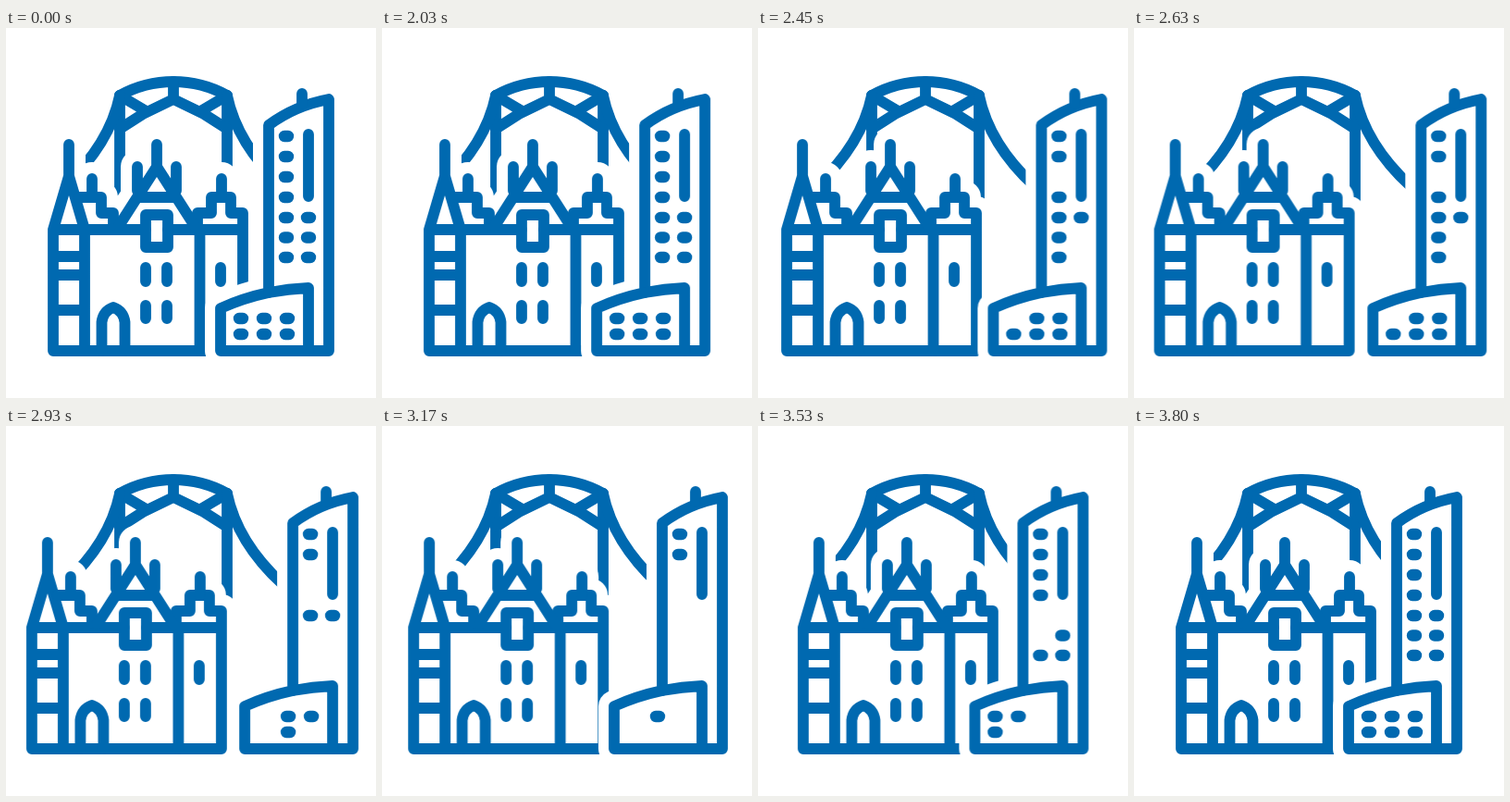
An HTML page for the animation above (3.83 s loop, 400 px wide and 400 px high).

```html
<!DOCTYPE html>
<html lang="en">
<head>
<meta charset="utf-8">
<title>City icon</title>
<style>
  html, body { margin: 0; height: 100%; overflow: hidden; background: #fff; }
  svg { display: block; width: 100%; height: 100%; }
  .line { fill: none; stroke: #0069b0; stroke-width: 11.8; stroke-linecap: round; stroke-linejoin: round; }
  .halo { fill: #fff; stroke: #fff; stroke-width: 34; stroke-linejoin: round; }
  .castle .halo { stroke-width: 36; }
  .win { stroke-width: 12.4; }

  .castle, .tower { animation: slide 3830ms infinite; }
  .castle { --far: -24px; }
  .tower { --far: 27px; }
  @keyframes slide {
    0% { transform: translateX(0); }
    52.22% { transform: translateX(0); animation-timing-function: cubic-bezier(.36, 0, .3, 1); }
    72.32% { transform: translateX(var(--far)); animation-timing-function: cubic-bezier(.54, 0, .41, 1); }
    99.22%, 100% { transform: translateX(0); }
  }

  /* windows go dark and light up again in small groups */
  .early, .mid, .late, .last { animation: 3830ms step-end infinite; }
  .early { animation-name: early; }
  .mid { animation-name: mid; }
  .late { animation-name: late; }
  .last { animation-name: last; }
  @keyframes early { 0%, 83.6% { opacity: 1; } 62.2% { opacity: 0; } }
  @keyframes mid { 0%, 84.9% { opacity: 1; } 69.2% { opacity: 0; } }
  @keyframes late { 0%, 93% { opacity: 1; } 71.8% { opacity: 0; } }
  @keyframes last { 0%, 93% { opacity: 1; } 80.4% { opacity: 0; } }
</style>
</head>
<body>
<svg viewBox="0 0 400 400">
  <defs>
    <path id="castle" d="M51 349V218L68 160V126V160L75 183H93V163V183H103V200H130L142 182V150V182L163 150V126V150L184 182V150V182L196 200H222V183H233V163V183H243V200H256V349Z"/>
    <path id="tower" d="M232 349V303Q256 292 284 286V105Q312 84 349 77V349Z"/>
  </defs>

  <g class="line">
    <path d="M123 178V73Q150 58 181 58Q212 58 239 73V200"/>
    <path d="M123 109L148 93L181 77L214 93L239 109M181 58V77M123 73L150 89M239 73L212 89"/>
    <path d="M123 73Q112 126 63 171M239 73Q250 126 299 171"/>
  </g>

  <g class="castle">
    <use href="#castle" class="halo"/>
    <g class="line">
      <path d="M51 349V218L68 160V126M68 160L85 218V349M51 349H256V200H243V183H222V200H207V213M51 218H151M175 218H256M51 247H85M51 267H85M51 305H85"/>
      <path d="M79 183H103V200H116V213M93 163V183M233 163V183"/>
      <path d="M163 126V150L122 214M163 150L204 214M142 183H184M142 150V176M184 150V176M209.500 218V349"/>
      <path d="M151 202H175V237H151Z"/>
      <path d="M103.500 349V318Q105 306 116 302Q127 306 128.500 318V349"/>
      <path d="M151 259V274M174 259V274M232 259V274M151 300V314M174 300V314"/>
    </g>
  </g>

  <g class="tower">
    <use href="#tower" class="halo"/>
    <path class="halo" d="M320 71V82"/>
    <use href="#tower" class="line"/>
    <path class="line" d="M320 71V82M327 115V182M284 286Q305 282 327 281V349"/>
    <g class="line win">
      <path d="M301 117h4M301 139h4"/>
      <path class="early" d="M301 161h4M325 226.500h4M325 248h4M252 314h4"/>
      <path class="mid" d="M301 183h4M301 248h4M252 331h4"/>
      <path class="late" d="M301 226.500h4M302 331h4"/>
      <path class="last" d="M301 205h4M325 205h4M302 314h4M277 331h4"/>
      <path d="M277 314h4"/>
    </g>
  </g>
</svg>
</body>
</html>
```
